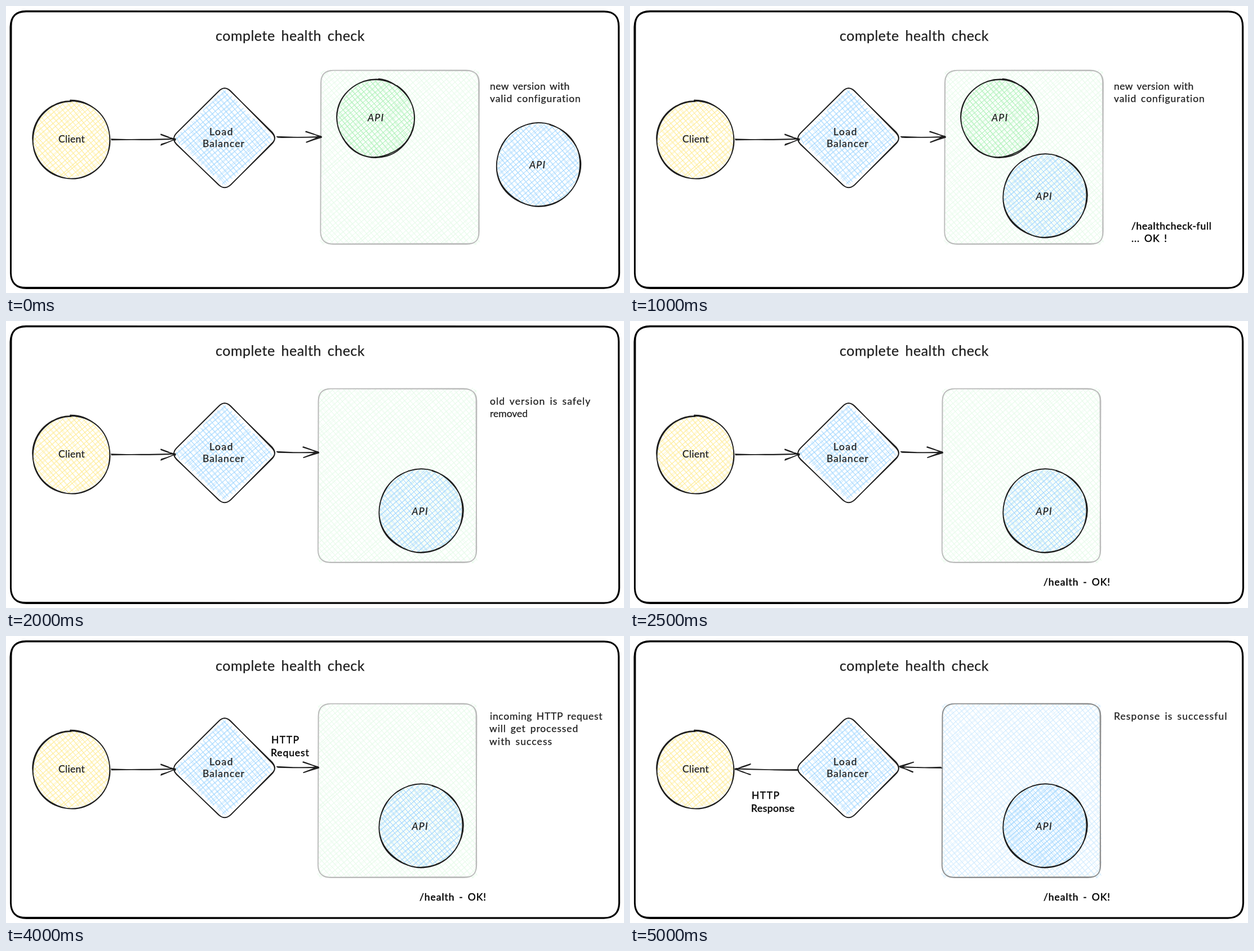
Write an HTML page that moves like this. It is 1097 by 511 pixels and loops after 7 s.

```html
<!DOCTYPE html>
<html lang="en">
<head>
<meta charset="utf-8">
<title>Complete health check</title>
<style>
  html, body { margin: 0; width: 100%; height: 100%; overflow: hidden; background: #fff; }
  svg { display: block; width: 100vw; height: 100vh; }
  path { fill: none; stroke: #1e1e1e; stroke-width: 1.75; stroke-linecap: round; stroke-linejoin: round; }
  text { font: 17.5px Lato, "Open Sans", sans-serif; word-spacing: 2.5px; fill: #1e1e1e; stroke: #1e1e1e; stroke-width: .25; }
  .title { font-size: 25px; word-spacing: 4px; }
  .slant { font-style: italic; }
  .ink { fill: #000; stroke: #000; stroke-width: .45; }
  .timed { animation: 7s step-end infinite; }
</style>
</head>
<body>
<svg id="stage" viewBox="0 0 1097 511"></svg>
<script>
const LOOP = 7;
const BLUE = '#a5d8ff', GREEN = '#b2f2bb', YELLOW = '#ffec99';
const rules = [];
let seed = 7;

function rand() {
  seed = (seed * 16807) % 2147483647;
  return seed / 2147483647;
}
const jit = a => (rand() * 2 - 1) * a;
const near = ([x, y], a) => [x + jit(a), y + jit(a)];
const mix = (p, q, t) => [p[0] + (q[0] - p[0]) * t, p[1] + (q[1] - p[1]) * t];
const pt = p => p.map(v => v.toFixed(1)).join(' ');

const path = (d, style = '') => `<path d="${d}" style="${style}"/>`;
const move = (x, y, body) => `<g transform="translate(${x} ${y})">${body}</g>`;
const fade = (a, body) => `<g opacity="${a}">${body}</g>`;
const text = (x, y, str, gap, cls = '') =>
  `<text x="${x}" y="${y}" class="${cls}" letter-spacing="${gap}">${str}</text>`;

// Visible only between two times, in seconds
function show(from, to, body) {
  const id = 'show' + rules.length;
  const at = t => (t / LOOP * 100).toFixed(4) + '%';
  rules.push(`@keyframes ${id}{0%{visibility:hidden}${at(from)}{visibility:visible}${at(to)}{visibility:hidden}}`);
  return `<g class="timed" style="animation-name:${id}">${body}</g>`;
}

// A pencil line drawn twice, slightly bowed
function stroke(p, q, a = 1) {
  const once = () => `M${pt(near(p, a))}Q${pt(near(mix(p, q, 0.5), a))} ${pt(near(q, a))}`;
  return once() + once();
}

// A circle drawn in two wobbly turns, each overlapping its own start
function ring(cx, cy, r, start) {
  let d = '';
  for (let turn = 0; turn < 2; turn++) {
    const step = 0.7, k = step / 3, from = start + turn * 0.5;
    let last;
    for (let a = from; a < from + 2 * Math.PI + step; a += step) {
      const s = r + jit(1.6), c = Math.cos(a) * s, n = Math.sin(a) * s;
      const p = [cx + c, cy + n];
      const back = [p[0] + n * k, p[1] - c * k], ahead = [p[0] - n * k, p[1] + c * k];
      d += last ? `C${pt(last)} ${pt(back)} ${pt(p)}` : `M${pt(p)}`;
      last = ahead;
    }
  }
  return path(d);
}

// A polygon with rounded corners, drawn in two wobbly turns
function rounded(poly, r, a, style) {
  let d = '';
  for (let turn = 0; turn < 2; turn++) {
    poly.forEach((p, i) => {
      const prev = poly.at(i - 1), next = poly[(i + 1) % poly.length];
      const cut = q => near(mix(p, q, r / Math.hypot(q[0] - p[0], q[1] - p[1])), a);
      d += (i ? 'L' : 'M') + pt(cut(prev)) + 'Q' + pt(p) + ' ' + pt(cut(next));
    });
    d += 'Z';
  }
  return path(d, style);
}

const rect = (l, t, r, b) => [[l, t], [r, t], [r, b], [l, b]];

function disc(cx, cy, r) {
  return Array.from({ length: 40 }, (_, i) => {
    const a = i * Math.PI / 20;
    return [cx + r * Math.cos(a), cy + r * Math.sin(a)];
  });
}

// Pencil lines across a convex polygon, in one direction
function lines(poly, deg) {
  const gap = 7.04, a = deg * Math.PI / 180, c = Math.cos(a), s = Math.sin(a);
  const turned = poly.map(([x, y]) => [x * c + y * s, y * c - x * s]);
  const vs = turned.map(p => p[1]);
  const end = Math.max(...vs);
  let d = '';
  for (let v = Math.min(...vs) + gap / 2; v < end; v += gap) {
    const cross = [];
    turned.forEach((p, i) => {
      const q = turned[(i + 1) % turned.length];
      if ((p[1] > v) !== (q[1] > v)) cross.push(mix(p, q, (v - p[1]) / (q[1] - p[1]))[0]);
    });
    const [from, to] = cross.map(u => [u * c - v * s, u * s + v * c]);
    d += stroke(from, to, 1.9);
  }
  return d;
}

const hatch = (poly, color) => path(lines(poly, -41) + lines(poly, 49), `stroke:${color};stroke-width:.9`);

function ball(cx, cy, r, color, start) {
  return hatch(disc(cx, cy, r - 1), color) + ring(cx, cy, r, start);
}

function arrow(p, q, len = 28) {
  const a = Math.atan2(p[1] - q[1], p[0] - q[0]);
  const barb = turn => stroke([q[0] + len * Math.cos(a + turn), q[1] + len * Math.sin(a + turn)], q);
  return path(stroke(p, q, 1.5) + barb(0.35) + barb(-0.35));
}

function pool(color) {
  seed = 91;
  const area = rect(559, 115, 840, 424);
  return hatch(area, color) + rounded(area, 22, 1);
}

function balancer() {
  const shape = [[388, 141.5], [482, 236], [388, 328], [293, 236]];
  return hatch(shape.map(p => mix(p, [388, 236], 0.08)), BLUE) + rounded(shape, 14, 1) +
    text(361, 230, 'Load', 1.6) + text(349, 251, 'Balancer', 1.1);
}

function newApi() {
  seed = 53;
  return ball(945, 283, 74, BLUE, -1.3) + text(929, 289, 'API', 1.3, 'slant');
}

const request = text(205, 190, 'HTTP', 1.5, 'ink') + text(204, 213, 'Request', 0.9, 'ink');
const reply = text(216, 290, 'HTTP', 1.5, 'ink') + text(215, 313, 'Response', 0.5, 'ink');
const shifted = body => move(-4.5, 6, body);

document.getElementById('stage').innerHTML = [
  rounded(rect(8.7, 9.7, 1088, 502), 27, 0.7, 'stroke:#000;stroke-width:3'),
  text(372, 62, 'complete health check', 0.5, 'title'),
  ball(116, 238, 69, YELLOW, -2.1) + text(93, 243, 'Client', 0.3),
  balancer(),
  show(0, 2, fade(0.3, pool(GREEN)) + arrow([482, 233.5], [559, 233]) +
    ball(656.5, 200, 69, GREEN, -1.5) + text(642, 205, 'API', 1.3, 'slant')),
  show(2, 4.5, shifted(fade(0.3, pool(GREEN))) + arrow([482, 233.5], [554, 234])),
  show(4.5, 7, shifted(fade(0.5, pool(BLUE))) + arrow([553, 234.5], [479, 233], 25) +
    arrow([298, 238], [187, 237.5])),
  show(0, 4.5, arrow([187, 238], [300, 238], 26)),
  show(0, 1, newApi()),
  show(1, 7, move(-208.5, 55.5, newApi())),
  show(0, 1.5, text(859, 149, 'new version with', 0.4) + text(859, 171, 'valid configuration', 0.9)),
  show(0.5, 1.5, text(890, 398, '/healthcheck-full', 0.7, 'ink')),
  show(1, 1.5, text(890, 420, '... OK !', 0.9, 'ink')),
  show(1.5, 2.5, text(859, 149, 'old version is safely', 1.1) + text(859, 171, 'removed', 0)),
  show(2.5, 7, text(734, 471, '/health - OK!', 0.95, 'ink')),
  show(3.5, 4.5, text(859, 149, 'incoming HTTP request', 0.7) +
    text(858, 171, 'will get processed', 0.9) + text(858, 194, 'with success', 1.1)),
  show(3.5, 4, request),
  show(4, 4.5, move(266, 1, request)),
  show(4.5, 7, text(859, 149, 'Response is successful', 1.1)),
  show(4.5, 5, move(258, 0, reply)),
  show(5, 7, reply)
].join('');

document.head.appendChild(document.createElement('style')).textContent = rules.join('\n');
</script>
</body>
</html>
```
